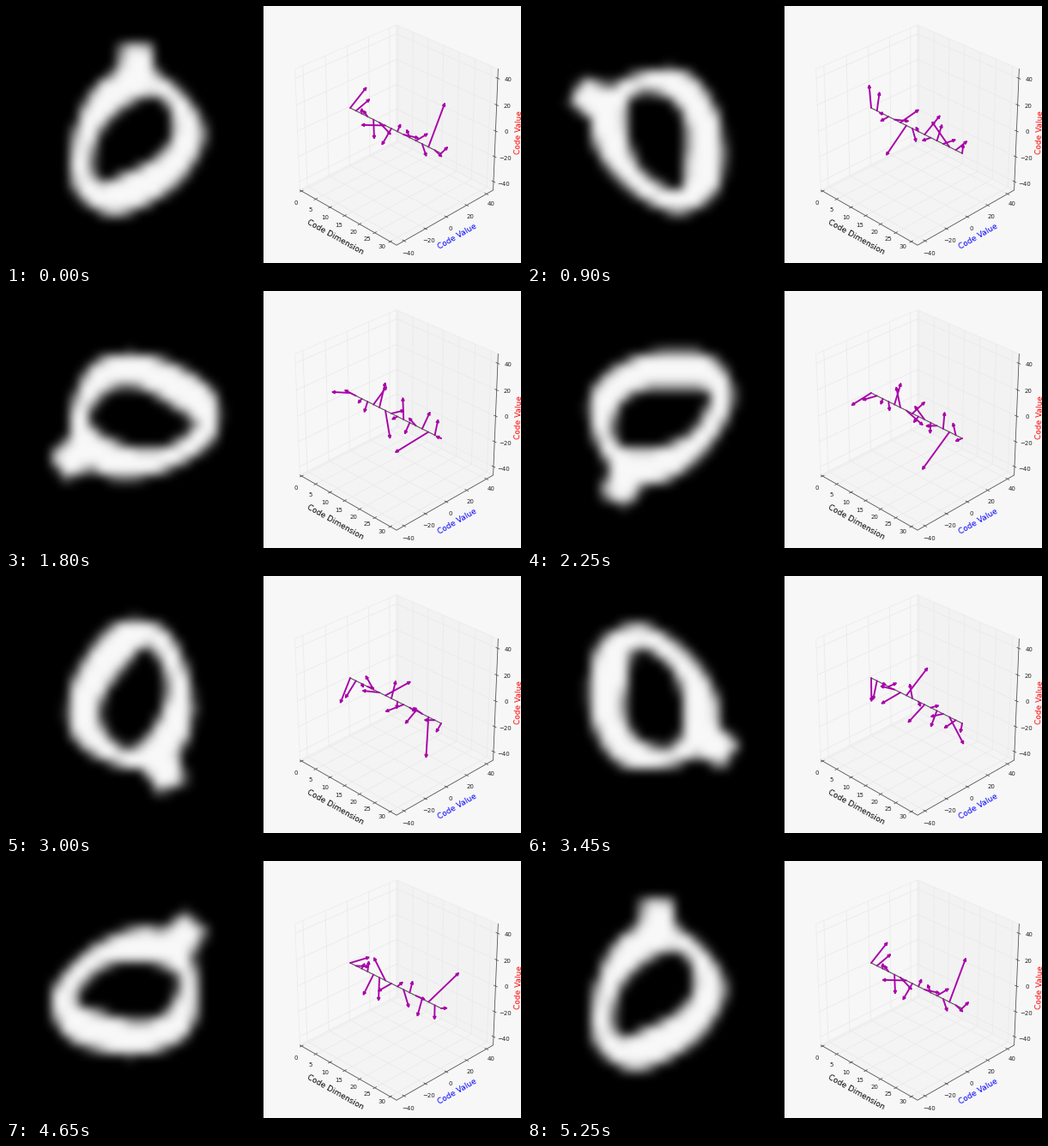
These frames come from a looping animation (600 by 300 pixels, 5400 ms). A matplotlib script:

```python
import matplotlib.pyplot as plt
import numpy as np
from matplotlib.animation import FuncAnimation
from matplotlib.patches import FancyArrowPatch, Polygon
from matplotlib.path import Path

W, H, FRAMES = 600, 300, 36
CELLS, SUB = 28, 5
PT = 0.72                         # points per pixel at 100 dpi
X_START, X_END = -0.4817, 0.4385  # code dimensions 0 and 30 in the unit cube
SPAN = 93.75                      # padded range of the value axes
DARK = "#505050"

fig = plt.figure(figsize=(W / 100, H / 100), dpi=100, facecolor="#f7f7f7")
ax = fig.add_axes([0, 0, 1, 1])


def project(x, y, z):
    """Perspective view of a unit cube from azimuth -45, elevation 30."""
    scale = 1632 / (10 - 0.6124 * (x - y) - 0.5 * z)
    right = 0.7071 * (x + y)
    up = 0.35355 * (y - x) + 0.866 * z
    return 455 + right * scale, 146 - up * scale


def line(*points, color="#eaeaea", width=0.8, z=2):
    xs, ys = zip(*(project(*p) for p in points))
    ax.plot(xs, ys, color=color, lw=width * PT, zorder=z)


def pane(color, *corners):
    ax.add_patch(Polygon([project(*c) for c in corners], fc=color,
                         ec="#ececec", lw=0.8 * PT, zorder=1))


def text(x, y, s, size, color="black", angle=0):
    ax.text(x, y, s, fontsize=size * PT, color=color, rotation=angle,
            ha="center", va="center", family="DejaVu Sans", zorder=6)


def tick_labels(values, start, end):
    for s, v in zip(np.linspace(0, 1, len(values)), values):
        x, y = np.add(start, s * np.subtract(end, start))
        text(x, y, str(v).replace("-", "\u2212"), 7, "#222222")


# Cube panes, grid, spines and ticks
h = 0.5
pane("#f7f7f7", (-h, -h, -h), (-h, h, -h), (-h, h, h), (-h, -h, h))
pane("#f2f2f2", (-h, h, -h), (h, h, -h), (h, h, h), (-h, h, h))
pane("#f4f4f4", (-h, -h, -h), (h, -h, -h), (h, h, -h), (-h, h, -h))

dims, values = range(0, 31, 5), range(-40, 41, 20)
for d in dims:
    t = X_START + (X_END - X_START) * d / 30
    line((t, -h, -h), (t, h, -h), (t, h, h))
    line((t, -h - 0.015, -h), (t, -h + 0.015, -h), color=DARK)
for v in values:
    t = v / SPAN
    line((h, t, -h), (-h, t, -h), (-h, t, h))
    line((-h, -h, t), (-h, h, t), (h, h, t))
    line((h - 0.015, t, -h), (h + 0.015, t, -h), color=DARK)
    line((h - 0.015, h, t), (h + 0.015, h, t), color=DARK)
line((-h, -h, -h), (h, -h, -h), (h, h, -h), (h, h, h), color=DARK, z=3)

tick_labels(dims, (338, 230), (438, 281))
tick_labels(values, (469, 289), (565.5, 231))
tick_labels(values, (580, 208), (585, 86.5))
text(383.5, 269.5, "Code Dimension", 9, angle=-29.2)
text(526, 269, "Code Value", 9, "blue", 30)
text(597.5, 147, "Code Value", 9, "red", 87.6)

# Code vectors: length in pixels and starting angle in degrees
CODE = [(24, 33), (18, 17), (6, 88), (10.5, 122), (20, 272), (23, 308),
        (31, 157), (16.5, 225), (7.5, 57), (22, 329), (11, 112), (15, 4),
        (16, 290), (39, 61), (14.5, 311), (9, 20)]
LENGTHS, ANGLES = np.array(CODE).T
LENGTHS, ANGLES = LENGTHS / 115.4, np.radians(ANGLES)
BASES = np.linspace(X_START, X_END, len(CODE))

line((X_START, 0, 0), (X_END, 0, 0), color=DARK, width=1.1, z=4)
arrows = [ax.add_patch(FancyArrowPatch(
    (0, 0), (1, 1), arrowstyle="-|>", shrinkA=0, shrinkB=0,
    mutation_scale=4.5, lw=1.9 * PT, color="#a800a8", zorder=5))
    for _ in CODE]


def smooth_loop(points, steps=8):
    """Closed Catmull-Rom curve through the points."""
    p = np.array(points, float)
    before, after, far = (np.roll(p, k, axis=0) for k in (1, -1, -2))
    t = np.linspace(0, 1, steps, endpoint=False)[:, None, None]
    curve = p + 0.5 * t * (after - before + t * (
        2 * before - 5 * p + 4 * after - far
        + t * (3 * (p - after) + far - before)))
    return Path(curve.transpose(1, 0, 2).reshape(-1, 2))


# Digit: a ring with a short tail, relative to the left panel's centre
OUTER = smooth_loop([(0, -77), (40, -63), (75, -22), (78, 15), (45, 62),
                     (-20, 94), (-65, 72), (-74, 30), (-64, -22), (-38, -63)])
HOLE = smooth_loop([(15, -45), (36, -38), (45, -5), (29, 24), (-10, 45),
                    (-44, 55), (-46, 10), (-22, -24)])
side = (np.arange(CELLS * SUB) + 0.5) * 300 / (CELLS * SUB) - 150
GX, GY = (g.ravel() for g in np.meshgrid(side, side))


def digit(turn):
    c, s = np.cos(turn), np.sin(turn)
    x, y = GX * c - GY * s, GX * s + GY * c
    pts = np.column_stack([x, y])
    tail = (abs(x - 2) < 18 + 0.004 * (y + 107) ** 2) & (abs(y + 84) < 22)
    ink = (OUTER.contains_points(pts) | tail) & ~HOLE.contains_points(pts)
    cells = ink.reshape(CELLS, SUB, CELLS, SUB).mean(axis=(1, 3))
    return np.clip(0.5 + 1.15 * (cells - 0.5), 0, 1)


picture = ax.imshow(digit(0), cmap="gray", vmin=0, vmax=1 / 0.97,
                    extent=(0, 300, 300, 0), interpolation="bicubic",
                    aspect="auto", zorder=1)
ax.set(xlim=(0, W), ylim=(H, 0))
ax.axis("off")


def update(i):
    turn = 2 * np.pi * i / (FRAMES - 1)
    picture.set_data(digit(turn))
    for arrow, x, r, angle in zip(arrows, BASES, LENGTHS, ANGLES + turn):
        tip = project(x, r * np.cos(angle), r * np.sin(angle))
        arrow.set_positions(project(x, 0, 0), tip)
    return [picture, *arrows]


anim = FuncAnimation(fig, update, frames=FRAMES, interval=150,
                     repeat=True, repeat_delay=0, blit=False)
plt.show()
```
